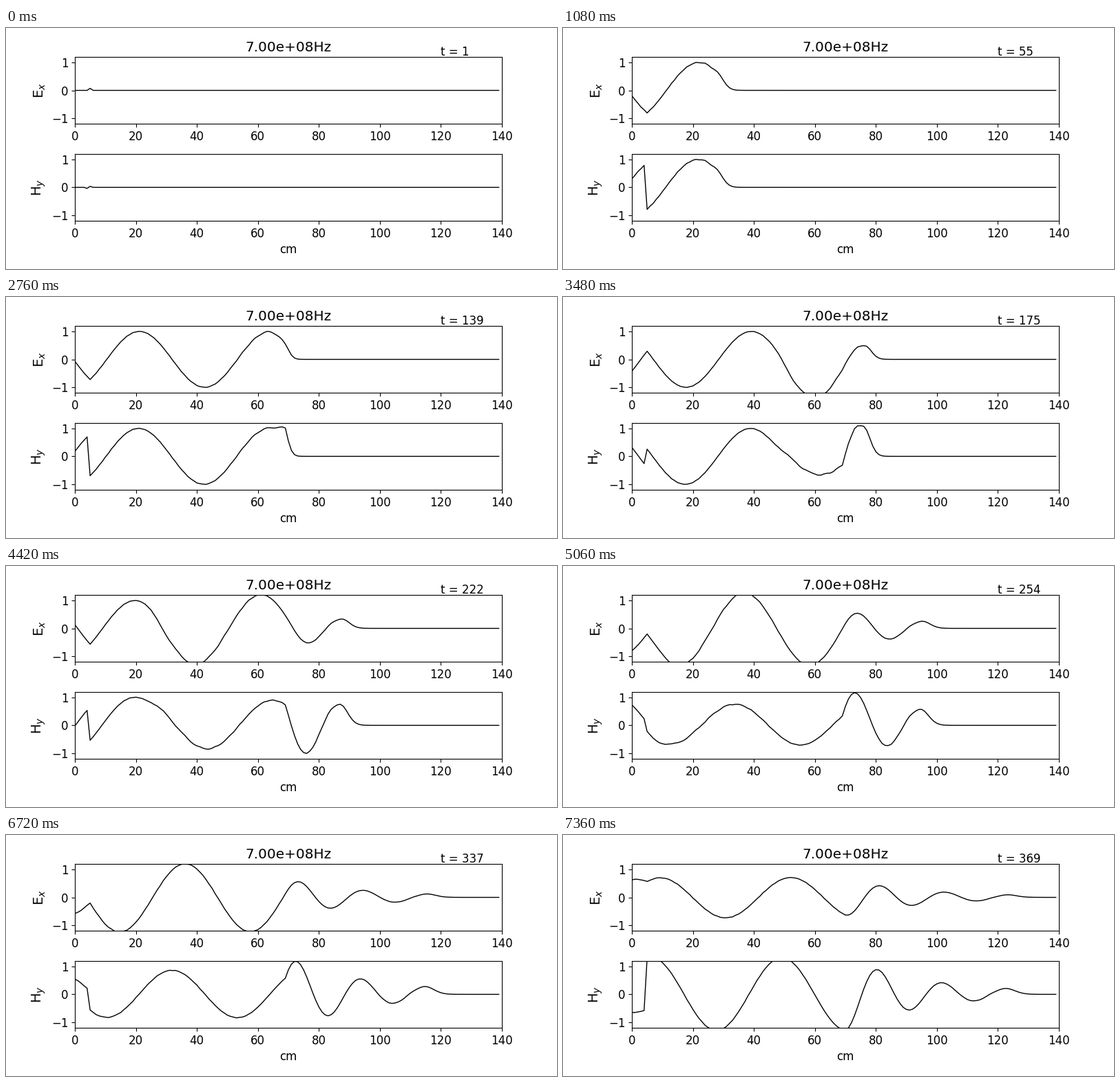
A matplotlib script that plays this animation: 800x350 px, repeating every 7.38 s.

```python
"""1D FDTD: a sine wave entering a lossy dielectric."""
import numpy as np
import matplotlib.pyplot as plt
from matplotlib.animation import FuncAnimation

CELLS, STEPS = 140, 369
SOURCE, SLAB = 5, 70
FREQ = 700e6
DX = 0.01
DT = DX / 6e8
EPS0, EPS_R, SIGMA = 8.854e-12, 4.0, 0.04


def simulate():
    """Return the E and H fields after every time step."""
    ex, hy = np.zeros(CELLS), np.zeros(CELLS)
    ca, cb = np.ones(CELLS), np.full(CELLS, 0.5)
    loss = DT * SIGMA / (2 * EPS0 * EPS_R)
    ca[SLAB:] = (1 - loss) / (1 + loss)
    cb[SLAB:] = 0.5 / (EPS_R * (1 + loss))
    low, high = [0.0, 0.0], [0.0, 0.0]
    history = []
    for t in range(1, STEPS + 1):
        ex[1:] = ca[1:] * ex[1:] + cb[1:] * (hy[:-1] - hy[1:])
        ex[SOURCE] += np.sin(2 * np.pi * FREQ * DT * t)
        # absorbing boundaries
        ex[0] = low.pop(0)
        low.append(ex[1])
        ex[-1] = high.pop(0)
        high.append(ex[-2])
        hy[:-1] += 0.5 * (ex[:-1] - ex[1:])
        history.append((ex.copy(), hy.copy()))
    return history


def setup(ax, label):
    ax.set_xlim(0, CELLS)
    ax.set_xticks(range(0, CELLS + 1, 20))
    ax.set_ylim(-1.2, 1.2)
    ax.set_yticks([-1, 0, 1])
    ax.set_ylabel(label, fontsize=14)
    return ax.plot(np.arange(CELLS), np.zeros(CELLS), "k", lw=1)[0]


plt.rcParams["font.size"] = 12
fig, (ax_e, ax_h) = plt.subplots(2, 1, figsize=(8, 3.5), dpi=100)
fig.subplots_adjust(left=0.125, right=0.9, top=0.88, bottom=0.2, hspace=0.45)
lines = [setup(ax_e, "E$_x$"), setup(ax_h, "H$_y$")]
ax_e.set_title(f"{FREQ:.2e}Hz")
ax_h.set_xlabel("cm")
clock = ax_e.text(120, 1.25, "")
fields = simulate()


def update(i):
    for line, values in zip(lines, fields[i]):
        line.set_ydata(values)
    clock.set_text(f"t = {i + 1}")
    return *lines, clock


anim = FuncAnimation(fig, update, frames=STEPS, interval=20,
                     repeat=True, repeat_delay=0)
plt.show()
```
